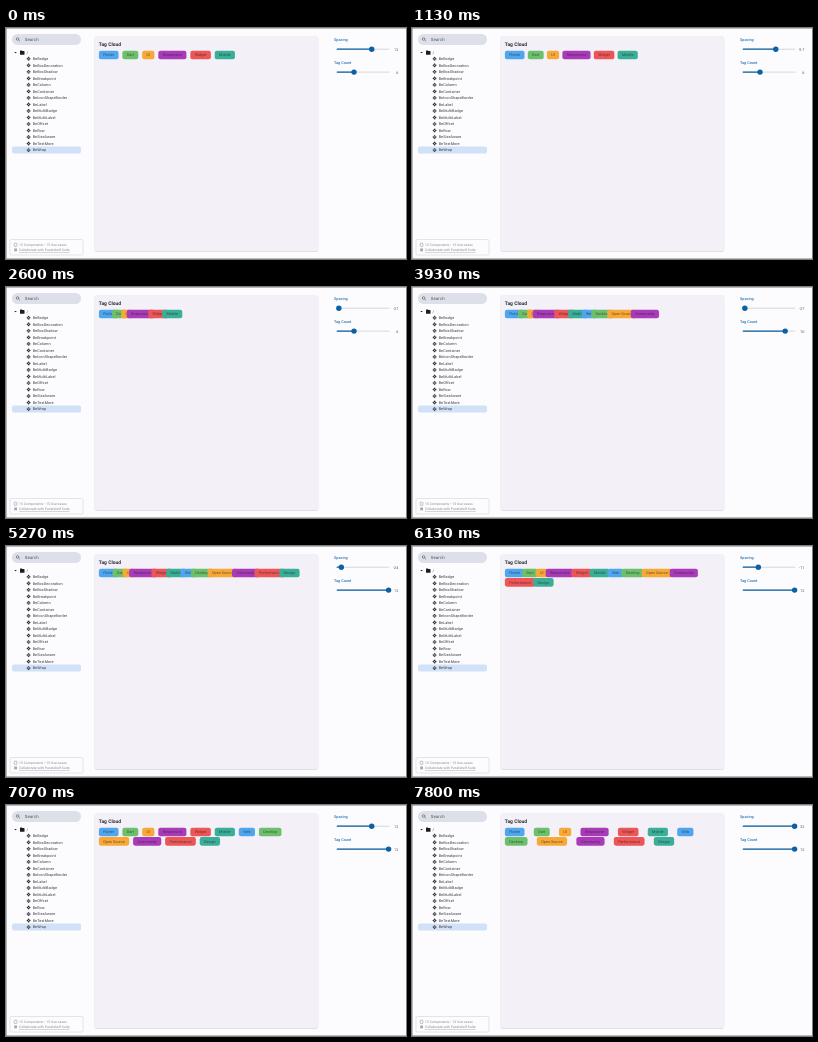
An HTML page for the animation above (8 s loop, 400 by 231 pixels).

```html
<!DOCTYPE html>
<html lang="en">
<head>
<meta charset="utf-8">
<title>Tag Cloud</title>
<style>
  html, body { margin: 0; width: 100%; height: 100%; overflow: hidden; background: #fcfbfe; }
  svg { display: block; width: 100vw; height: 100vh; }
  text { font: 3.8px Roboto, sans-serif; fill: #3c3f45; text-rendering: geometricPrecision; }
  .title { font-size: 4.95px; font-weight: 700; fill: #2b2d32; }
  .item { letter-spacing: .06px; }
  .search { font-size: 4.32px; letter-spacing: .13px; fill: #4d5158; }
  .label { font-weight: 500; fill: #2674b3; }
  .value { text-anchor: end; fill: #55585f; }
  .foot { font-size: 3.35px; letter-spacing: .05px; fill: #85878c; }
  .line { fill: none; stroke: #85878c; stroke-width: .5; }
  .tag text { fill: #1a1c1e; fill-opacity: .62; }
</style>
</head>
<body>
<svg id="stage" viewBox="0 0 400 231">
  <defs>
    <filter id="shadow" x="-5%" y="-5%" width="110%" height="110%">
      <feDropShadow dx="0" dy=".4" stdDeviation=".7" flood-color="#000" flood-opacity=".28"/>
    </filter>
    <path id="cells" d="M0-2.2 1.1-1.1 0 0-1.1-1.1ZM0 0 1.1 1.1 0 2.2-1.1 1.1ZM-1.1-1.1 0 0-1.1 1.1-2.2 0ZM1.1-1.1 2.2 0 1.1 1.1 0 0Z"
      fill="#2b2d32" stroke="#fcfbfe" stroke-width=".25"/>
  </defs>

  <path d="M400 0H0V231H400" fill="none" stroke="#77787c"/>
  <rect x="6" y="6" width="69" height="11" rx="5.5" fill="#dde0e8"/>
  <g class="line" style="stroke:#4d5158;stroke-width:.6"><circle cx="11.6" cy="11" r="1.3"/><path d="M12.6 12 14 13.4"/></g>
  <text class="search" x="18.7" y="13">Search</text>

  <path d="M8.2 23.9h2.6l-1.3 1.4Z" fill="#1a1c1e"/>
  <path d="M14 22.9q0-.5.5-.5h1.3l.6.6h1.6q.5 0 .5.5v2.7q0 .5-.5.5h-3.5q-.5 0-.5-.5Z" fill="#1a1c1e"/>
  <text x="20.4" y="26">/</text>
  <rect x="6" y="118.6" width="69" height="6.8" rx="2" fill="#d1e1f8"/>
  <g id="tree"></g>

  <rect x="4" y="211.5" width="73" height="15.5" rx="1.3" fill="none" stroke="#cbccd1" stroke-width=".5"/>
  <rect class="line" x="8.2" y="215.2" width="2.7" height="3.2" rx=".5"/>
  <rect x="8.2" y="220.5" width="2.8" height="2.8" fill="#a5a7ac"/>
  <text class="foot" x="13" y="218">15 Components • 15 Use-cases</text>
  <text class="foot" x="13" y="223" text-decoration="underline">Collaborate with Panelshelf Suite</text>

  <rect x="88.5" y="8.3" width="223.8" height="214.7" rx="2.7" fill="#f3f1f7" filter="url(#shadow)"/>
  <text class="title" x="92.8" y="17.6">Tag Cloud</text>
  <g id="tags"></g>
  <g id="sliders"></g>
</svg>
<script>
const $ = id => document.getElementById(id);
const add = (parent, name, attrs, text = '') => {
  const el = document.createElementNS('http://www.w3.org/2000/svg', name);
  for (const k in attrs) el.setAttribute(k, attrs[k]);
  el.textContent = text;
  return parent.appendChild(el);
};

const items = 'Badge BoxDecoration BoxShadow Breakpoint Column Container IconShapeBorder Label MultiBadge MultiLabel Offset Row SizeAware TextMore Wrap';
items.split(' ').forEach((name, i) => {
  const y = 30.8 + i * 6.52;
  add($('tree'), 'use', { href: '#cells', x: 22.6, y });
  add($('tree'), 'text', { class: 'item', x: 26.7, y: y + 1.35 }, 'Be' + name);
});

// Tags take their width from their text
const LEFT = 92.9, RIGHT = 308.3, TOP = 22.7, PAD = 4.35, ROW = 9.4;
const colors = ['#4fa6ee', '#6cc06c', '#f8a836', '#a93bb9', '#ec5657', '#3bae98'];
const ruler = document.createElement('canvas').getContext('2d');
ruler.font = '38px Roboto, sans-serif';
const tags = 'Flutter,Dart,UI,Responsive,Widget,Mobile,Web,Desktop,Open Source,Community,Performance,Design'
  .split(',').map((name, i) => {
    const width = ruler.measureText(name).width / 10 + 2 * PAD;
    const el = add($('tags'), 'g', { class: 'tag' });
    add(el, 'rect', { width, height: 8.6, rx: 2.1, fill: colors[i % 6] });
    add(el, 'text', { x: PAD, y: 5.65 }, name);
    return { el, width };
  });

function layout(gap, count) {
  let x = LEFT, y = TOP;
  tags.forEach(({ el, width }, i) => {
    el.style.display = i < count ? '' : 'none';
    if (x + width > RIGHT) { x = LEFT; y += ROW; }
    el.setAttribute('transform', `translate(${x} ${y})`);
    x += width + gap;
  });
}

function slider(label, y, labelY, min, max) {
  const g = $('sliders');
  add(g, 'text', { class: 'label', x: 328, y: labelY }, label);
  add(g, 'path', { d: `M331 ${y}H383`, stroke: '#d5d8df', 'stroke-width': 1, 'stroke-linecap': 'round' });
  const active = add(g, 'path', { stroke: '#0b61a4', 'stroke-width': 1.3, 'stroke-linecap': 'round' });
  const thumb = add(g, 'circle', { cy: y, r: 2.7, fill: '#0b61a4' });
  const value = add(g, 'text', { class: 'value', x: 392.4, y: y + 1.5 });
  return (v, text) => {
    const x = 332 + 50.6 * (v - min) / (max - min);
    active.setAttribute('d', `M331.3 ${y}H${x}`);
    thumb.setAttribute('cx', x);
    value.textContent = text;
  };
}
const setSpacing = slider('Spacing', 21.2, 13.1, -28, 32);
const setCount = slider('Tag Count', 44.1, 36.2, 3, 12);

// [time, value] pairs of the two drags
const spacingKeys = [[0, 12], [1000, 12], [1200, 8.5], [1667, -3.1], [2333, -21], [2400, -21], [2600, -27],
  [5200, -27], [5267, -24], [5733, -20], [5867, -18], [6133, -11], [6667, 2], [7067, 12], [7133, 14],
  [7200, 14], [7800, 32], [8000, 32]];
const countKeys = [[0, 5.85], [3400, 5.85], [4133, 12], [8000, 12]];

function at(keys, t) {
  const i = Math.max(1, keys.findIndex(k => k[0] >= t));
  const [t0, a] = keys[i - 1], [t1, b] = keys[i];
  return a + (b - a) * (t - t0) / (t1 - t0);
}

const STEP = 200 / 3;
function draw(now) {
  const t = Math.floor((now % 8000 + 4) / STEP) * STEP % 8000;
  const spacing = at(spacingKeys, t), count = at(countKeys, t), shown = Math.round(count);
  setSpacing(spacing, String(+spacing.toPrecision(2)));
  setCount(count, shown);
  layout(spacing * .27 + .66, shown);
  requestAnimationFrame(draw);
}
draw(0);
</script>
</body>
</html>
```
